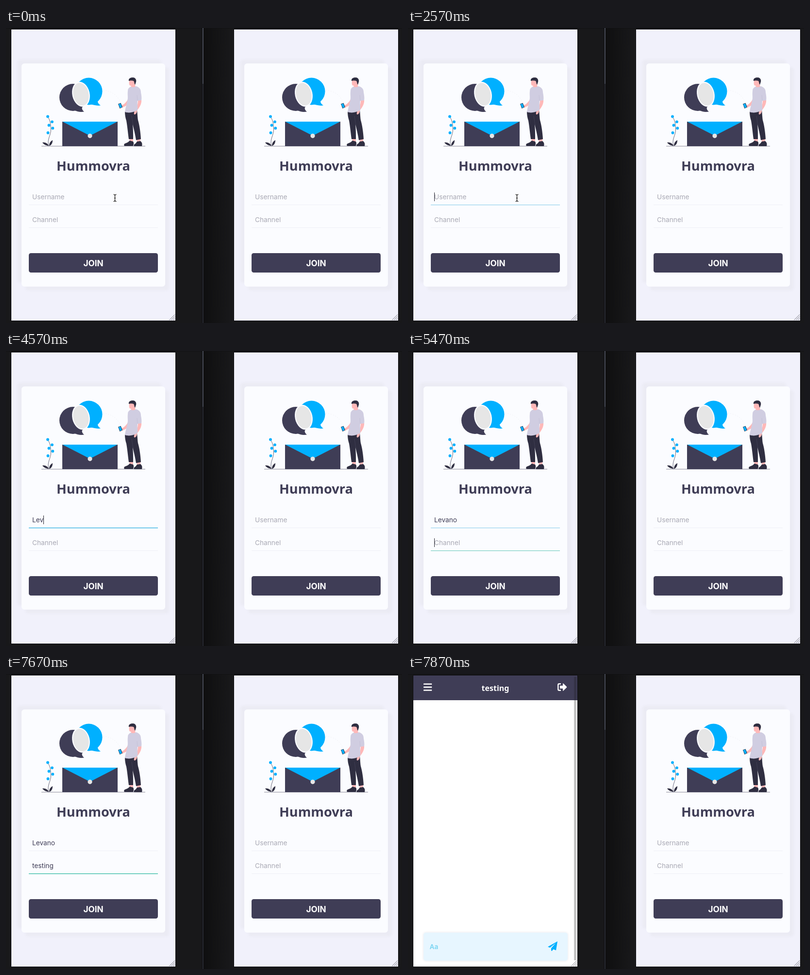
Animation, 816 px wide and 608 px high, one loop 8 s. Source, as an HTML page with a canvas:

```html
<!DOCTYPE html>
<html lang="en">
<head>
<meta charset="utf-8">
<title>Chat sign-in</title>
<style>
html, body { margin: 0; width: 100%; height: 100%; overflow: hidden; background: #18181a; }
canvas { display: block; }
</style>
</head>
<body>
<canvas id="stage" width="816" height="608"></canvas>
<script>
const ctx = document.getElementById('stage').getContext('2d');
const LOOP = 8000;
const C = {
  ink: '#3f3d56', dark: '#2f2e41', blue: '#00b0ff', skin: '#ffb8b8',
  shirt: '#d0cde1', pale: '#e6e6e6', panel: '#f1f1fb', card: '#fbfcff'
};
const UI = 'Inter, "Liberation Sans", sans-serif';
const HEAD = '"Noto Sans", "Open Sans", sans-serif';
const INPUT = '13.7px ' + UI;

// [time, text] pairs: the value holds until the next entry
const userKeys = [[0, ''], [3600, 'L'], [4570, 'Lev'], [4600, 'Levano']];
const channelKeys = [[0, ''], [5970, 't'], [6130, 'te'], [6230, 'tes'], [6330, 'test'],
  [7000, 'testi'], [7100, 'testin'], [7200, 'testing']];
const userCaret = [[2500, 3000], [3600, 4800]];
const channelCaret = [[5370, 6570], [7000, 7670]];

const valueAt = (keys, t) => keys.filter(k => k[0] <= t).pop()[1];
const within = (spans, t) => spans.some(([a, b]) => t >= a && t < b);
const fade = (t, start) => {
  const p = Math.min(1, Math.max(0, (t - start) / 290));
  return 1 - (1 - p) ** 2;
};

function rect(x, y, w, h, color) {
  ctx.fillStyle = color;
  ctx.fillRect(x, y, w, h);
}

function round(x, y, w, h, r, color) {
  ctx.fillStyle = color;
  ctx.beginPath();
  ctx.roundRect(x, y, w, h, r);
  ctx.fill();
}

function fill(d, color) {
  ctx.fillStyle = color;
  ctx.fill(new Path2D(d));
}

function stroke(d, color, width) {
  ctx.strokeStyle = color;
  ctx.lineWidth = width;
  ctx.stroke(new Path2D(d));
}

function oval(x, y, rx, ry, turn, color) {
  ctx.fillStyle = color;
  ctx.beginPath();
  ctx.ellipse(x, y, rx, ry, turn, 0, Math.PI * 2);
  ctx.fill();
}

const dot = (x, y, r, color) => oval(x, y, r, r, 0, color);

function text(s, x, y, font, color, align = 'left') {
  ctx.font = font;
  ctx.fillStyle = color;
  ctx.textAlign = align;
  ctx.fillText(s, x, y);
}

function backdrop() {
  rect(0, 0, 816, 608, '#18181a');
  const g = ctx.createLinearGradient(407, 0, 469, 0);
  g.addColorStop(0, '#0f0f10');
  g.addColorStop(1, '#19191b');
  rect(407, 0, 62, 608, g);
  rect(0, 0, 816, 1, '#111113');
  rect(404, 0, 1, 608, '#0b0b0c');
  rect(405, 0, 1.5, 608, '#30323d');
  rect(405, 0, 1.5, 115, '#555a68');
  for (const x of [10, 469]) rect(x, 2, 340, 602, '#0d0d0f');
}

function bubbles() {
  dot(138, 143, 28, C.ink);
  fill('M140 169 C147 173 154 173.500 161 172.500 C157 169 156 166 157 162 L150 160 Z', C.ink);
  dot(170.500, 130.500, 28, C.blue);
  fill('M172 157 C180 158 187 161 195 159.500 C190 156 188.500 153 189 149 L180 150 Z', C.blue);
  oval(154.500, 136.500, 18, 26, -0.22, C.card);
  oval(154.500, 136.500, 15.800, 23.600, -0.22, C.pale);
}

function plant() {
  stroke('M88 243 C84 228 93 222 92.500 208 C92 197 91 190 86 183', '#6b6a7c', 1);
  for (const [x, y] of [[86, 182.5], [95, 193.3], [88.5, 200.5], [96.3, 206.5], [86.500, 216]]) {
    dot(x, y, 2.9, C.blue);
  }
  fill('M75 236 C81 235 86 238 88 243 C82 242 78 240 75 236 Z', C.dark);
  fill('M96 231 C96 237 94 241 89 243 C89 238 91 234 96 231 Z', C.dark);
}

function envelope() {
  rect(116, 193, 114, 50.500, C.ink);
  fill('M116.500 193 H229.500 L173 222 Z', C.blue);
  dot(173, 222.300, 4.600, C.pale);
}

function man() {
  // ankles and shoes
  fill('M254 226 H262 L262 235 H255 Z M269 226 H277 L277 236 H270 Z', C.skin);
  fill('M255 232 L262 234 C264 237 263 240 262 243 H244 C242 240 244 238 248 237 C251 236 253 234 255 232 Z', C.dark);
  fill('M270 234 L277 233 C281 236 281 240 280 243.500 H264 C262 241 265 239 267 238 Z', C.dark);
  // trousers
  fill('M245 172 C253 174 263 172 270 169 C271 178 271 184 272 190 C275 200 277 214 278 229 L268 231 C266 218 263 207 261 198 C262 208 262 219 262 229 L253 229 C251 214 250 202 248 191 C246 185 245 179 245 172 Z', C.dark);
  stroke('M259 181 L262 201', '#45445a', 0.7);
  // phone arm
  fill('M252 145 L257 149 C254 155 249 160 242 163 C239 165 236 165 235 163 L238 160 C244 157 249 152 252 145 Z', C.skin);
  fill('M231 156.500 L236.500 154.500 L240 163 L234.500 166 Z', C.dark);
  fill('M231.700 157 L236 155.500 L239 163 L235 165 Z', C.blue);
  // head
  fill('M254 109 C254 105 266 105 267 110 L266 116 L267 123 C263 126 259 124 257 122 L258 119 C254 119 253 116 254 109 Z', C.skin);
  fill('M253 109 C252 104 257 101.500 262 102 C267 102.500 269 107 268 111 L266 117 C264 115 265 112 263 109 C260 108 256 108 253 109 Z', C.dark);
  // hanging arm, then shirt
  fill('M272 148 L279 147 C280 155 276 163 270 170 C270 175 267 179 264 178 C263 173 266 169 268 166 C271 160 272 154 272 148 Z', C.skin);
  fill('M257 121 C261 123 265 122 268 120 C275 122 278 126 278 133 C279 139 280 144 279 149 L271 150 C270 157 272 164 271 169 C263 174 253 176 245 173 C246 164 249 157 250 150 C252 145 250 137 251 130 C251 125 253 123 257 121 Z', C.shirt);
  stroke('M270 138 L271 150', '#bebbd2', 0.6);
}

function art() {
  ctx.setLineDash([2, 3]);
  stroke('M200 128 C218 130 230 139 235 152', '#eeeef3', 0.8);
  ctx.setLineDash([]);
  rect(73, 243, 214, 1, '#908f9d');
  bubbles();
  plant();
  envelope();
  man();
}

function grip() {
  stroke('M336.500 602 L348 590.500 M340.500 602 L348 594.500 M344.500 602 L348 598.500', '#77777f', 1);
}

function field(label, value, base, caretOn, glow, color) {
  text(value || label, 54, base, INPUT, value ? C.ink : '#a9a9b4');
  rect(47, base + 11, 266, 1, '#eff0f6');
  ctx.globalAlpha = glow;
  rect(47, base + 11, 266, 1.2, color);
  ctx.globalAlpha = 1;
  if (caretOn) {
    const w = value ? ctx.measureText(value).width : 0;
    rect(Math.round(54 + w), base - 14, 1, 18, '#22222c');
  }
}

function joinView(s) {
  rect(11, 3, 338, 600, C.panel);
  ctx.save();
  ctx.filter = 'blur(2px)';
  round(24, 65, 296, 460, 6, '#ebebf4');
  round(40, 81, 296, 460, 6, '#ebebf4');
  ctx.restore();
  round(32, 73, 296, 460, 6, C.card);
  art();
  text('Hummovra', 180, 294, 'bold 27.2px ' + HEAD, C.ink, 'center');
  field('Username', s.user, 353, s.userCaret, s.userGlow, '#1ca9df');
  field('Channel', s.channel, 400, s.channelCaret, s.channelGlow, '#22b59c');
  round(47, 464, 266, 40, 4.5, C.ink);
  text('JOIN', 180, 491, 'bold 17.2px ' + UI, '#fff', 'center');
  grip();
}

function chatView() {
  rect(11, 3, 338, 600, '#fff');
  rect(11, 3, 338, 51, C.ink);
  for (const y of [19.4, 25.8, 32.2]) round(32, y, 17.2, 2.6, 0.6, '#fff');
  text('testing', 180, 35, 'bold 16px ' + HEAD, '#fff', 'center');
  stroke('M315 20.300 H311.500 Q309.300 20.300 309.300 22.500 V31.500 Q309.300 33.700 311.500 33.700 H315', '#fff', 2.4);
  fill('M313 24 H319 V20 Q319.500 19 320.500 19.700 L327 26.300 Q327.600 27 327 27.700 L320.500 34.300 Q319.500 35 319 34 V30 H313 Z', '#fff');
  rect(342, 6, 5, 48, '#353347');
  rect(342, 54, 5, 536, '#c4c4c4');
  ctx.save();
  ctx.shadowColor = 'rgba(63,61,86,0.12)';
  ctx.shadowBlur = 5;
  round(32, 533, 297, 58, 5, '#e7f6ff');
  ctx.restore();
  text('Aa', 44.5, 567, '600 13.6px ' + UI, '#78d4f2');
  fill('M308 551 L305 569.500 L299.500 567.300 L296.500 571 L295 570 V565.300 L304.500 554.500 L292.500 564 L288 562.300 Z', C.blue);
  grip();
}

function pointer() {
  const d = 'M221.500 343 Q224.500 343 224.500 345.500 Q224.500 343 227.500 343 M224.500 345 V356 M221.500 357.500 Q224.500 357.500 224.500 355 Q224.500 357.500 227.500 357.500 M223 350.500 H226';
  stroke(d, '#fff', 2.4);
  stroke(d, '#111', 1.2);
}

function draw(t) {
  backdrop();
  if (t < 7830) {
    joinView({
      user: valueAt(userKeys, t),
      channel: valueAt(channelKeys, t),
      userCaret: within(userCaret, t),
      channelCaret: within(channelCaret, t),
      userGlow: fade(t, 2500) - fade(t, 5370),
      channelGlow: fade(t, 5370)
    });
    if (t < 3600) pointer();
  } else {
    chatView();
  }
  ctx.save();
  ctx.translate(459, 0);
  joinView({ user: '', channel: '', userGlow: 0, channelGlow: 0 });
  ctx.restore();
}

const start = performance.now();
function tick() {
  draw((performance.now() - start) % LOOP);
  requestAnimationFrame(tick);
}
tick();
</script>
</body>
</html>
```
